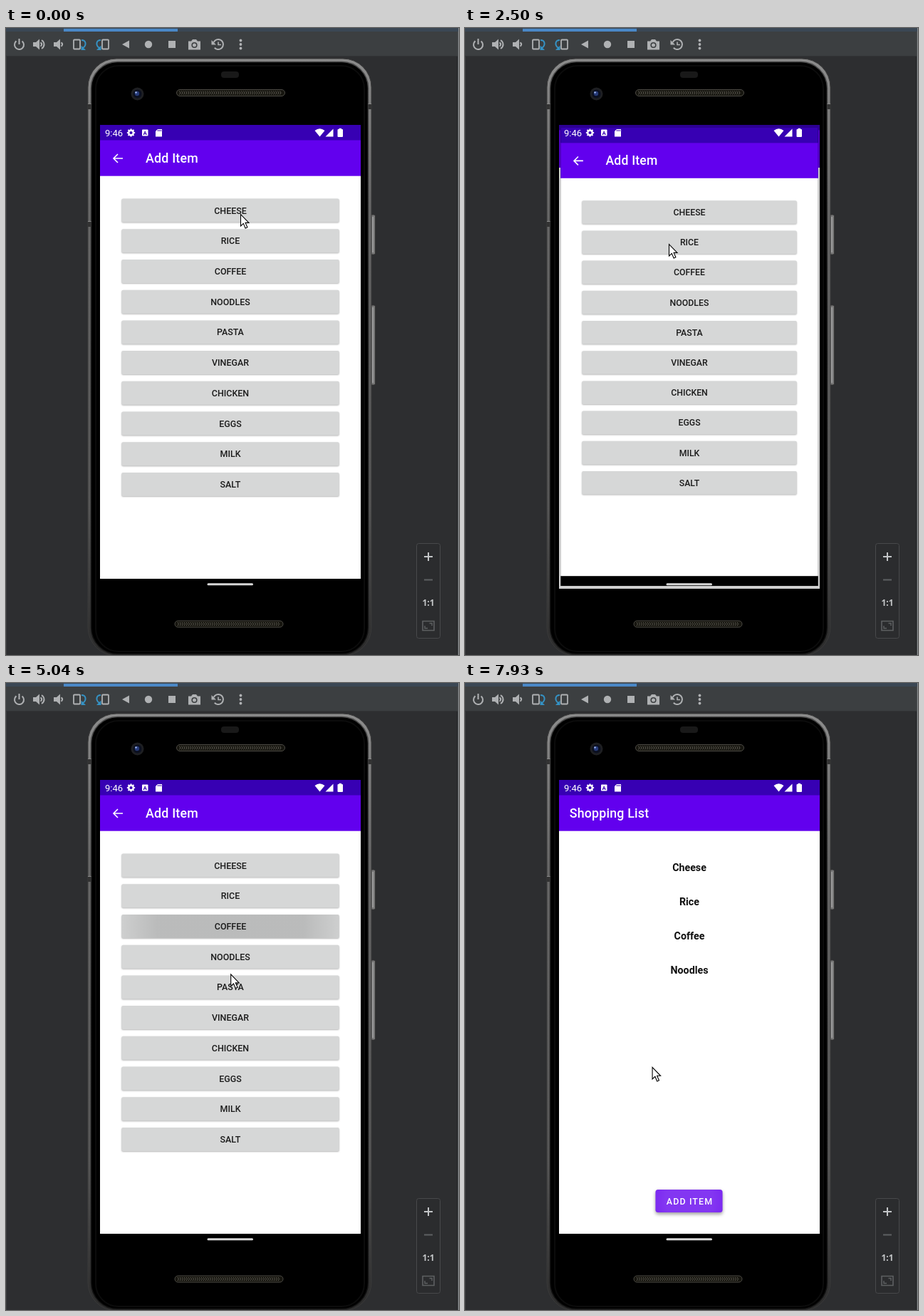
Recreate the animation shown at these times as an HTML page with a canvas. Size 636 by 880 pixels, loop 8000 ms.

```html
<!DOCTYPE html>
<html lang="en">
<head>
<meta charset="utf-8">
<title>Shopping list demo</title>
<style>
html, body { margin: 0; width: 100%; height: 100%; overflow: hidden; background: #2d2e30; }
canvas { display: block; width: 636px; height: 880px; }
</style>
</head>
<body>
<canvas id="stage" width="636" height="880"></canvas>
<script>
const W = 636, H = 880, LOOP = 8000;
const stage = document.getElementById('stage').getContext('2d');
const backdrop = document.createElement('canvas');
backdrop.width = W;
backdrop.height = H;
let c = backdrop.getContext('2d');

const SCREEN = { x: 132, y: 136, w: 366, h: 651, cx: 315, cy: 461.5 };
const GREY = '#afb1b3', BLUE = '#3592c4', DARK = '#3700b3', PURPLE = '#6200ee';
const ITEMS = ['Cheese', 'Rice', 'Coffee', 'Noodles', 'Pasta', 'Vinegar', 'Chicken', 'Eggs', 'Milk', 'Salt'];

// Taps alternate: pick an item, press "Add item", pick the next, and so on.
const TAPS = [354, 2056, 2890, 3885, 4798, 5907, 6860, 7900];
const TAP_DELAY = 280, SWITCH = 400;

const HOME = { x: 329, y: 261 };
const LEGS = [
  { at: 100, dur: 470, x: 315, y: 717 },
  { at: 2030, dur: 320, x: 286, y: 303 },
  { at: 3000, dur: 500, x: 300, y: 722 },
  { at: 3760, dur: 240, x: 270, y: 351 },
  { at: 4200, dur: 420, x: 318, y: 340 },
  { at: 4900, dur: 530, x: 302, y: 732 },
  { at: 5850, dur: 450, x: 311, y: 395 },
  { at: 7100, dur: 470, x: 302, y: 722 },
  { at: 7800, dur: 260, x: 224, y: 360 }
];

const clamp = v => Math.max(0, Math.min(1, v));
const smooth = v => v * v * (3 - 2 * v);
const mix = (a, b, f) => a + (b - a) * f;

function rect(x, y, w, h, color) {
  c.fillStyle = color;
  c.fillRect(x, y, w, h);
}
function round(x, y, w, h, r, fill, line, width = 1) {
  c.beginPath();
  c.roundRect(x, y, w, h, r);
  if (fill) { c.fillStyle = fill; c.fill(); }
  if (line) { c.strokeStyle = line; c.lineWidth = width; c.stroke(); }
}
function disc(x, y, r, color) {
  c.fillStyle = color;
  c.beginPath();
  c.arc(x, y, r, 0, 7);
  c.fill();
}
function arc(x, y, r, from, to, color, width) {
  c.strokeStyle = color;
  c.lineWidth = width;
  c.beginPath();
  c.arc(x, y, r, from, to);
  c.stroke();
}
function shape(d, fill, line, width = 1.5, x = 0, y = 0) {
  const p = new Path2D(d);
  c.save();
  c.translate(x, y);
  if (fill) { c.fillStyle = fill; c.fill(p); }
  if (line) { c.strokeStyle = line; c.lineWidth = width; c.stroke(p); }
  c.restore();
}
function text(s, x, y, font, color, align = 'left', spacing = 0) {
  c.font = font;
  c.fillStyle = color;
  c.textAlign = align;
  c.letterSpacing = spacing + 'px';
  c.fillText(s, x, y);
}
const roboto = (weight, size) => `${weight} ${size}px Roboto, sans-serif`;
const sans = size => `${size}px "Open Sans", sans-serif`;

function fade(y0, y1, ...colors) {
  const g = c.createLinearGradient(0, y0, 0, y1);
  colors.forEach((color, i) => g.addColorStop(i / (colors.length - 1), color));
  return g;
}

function toolbar() {
  rect(0, 0, W, 5, '#3b4754');
  rect(81, 1, 160, 4, '#4a88c7');
  rect(0, 5, W, 35, '#3c3f41');
  rect(0, 39, W, 1, '#323436');
  arc(18.5, 23.5, 6.5, -0.9, 4.05, GREY, 2);
  rect(17.5, 15, 2, 8, GREY);
  for (const [x, loud] of [[46, true], [74, false]]) {
    const left = loud ? x - 8 : x - 7;
    shape('M0-3H4L9-7.5V7.5L4 3H0Z', GREY, null, 1, left, 23);
    arc(left + 9, 23, 3, -1.1, 1.1, GREY, 2);
    if (loud) arc(left + 9, 23, 6.5, -1.1, 1.1, GREY, 2);
  }
  for (const [x, dir] of [[103, 1], [136, -1]]) {
    c.save();
    c.translate(x, 23);
    c.scale(dir, 1);
    round(-8, -6.5, 9, 13, 1, null, GREY, 1.8);
    shape('M3-6C9.5-6 10.500 1 5 5', null, BLUE, 2);
    shape('M2.500 1.500V8H9Z', BLUE);
    c.restore();
  }
  shape('M163 23L173 17.5V28.5Z', GREY);
  disc(200, 23, 5.2, GREY);
  rect(228, 18, 10, 10, GREY);
  shape('M256 18.5H260L262 16H267L269 18.5H273V30.500H256Z', GREY);
  arc(264.5, 24, 3.3, 0, 7, '#3c3f41', 1.6);
  arc(298, 23, 7, -2.7, 2.4, GREY, 2);
  shape('M288.500 17V23.500H295Z', GREY);
  shape('M298 19.500V23.500H302', null, GREY, 1.6);
  for (const y of [17.5, 23, 28.5]) disc(329.5, y, 1.9, GREY);
}

function grille(x, y) {
  round(x, y, 152, 9, 4.5, '#16150f', '#4d4b45');
  for (let i = 0; i < 48; i++) {
    shape('M0 0L1.500 2.500L0 5', null, '#5c5a52', 1, x + 4 + i * 3, y + 2);
  }
}

function phone() {
  for (const [y, h] of [[262, 56], [389, 112]]) {
    round(511, y, 7.5, h, 2, '#777', '#333');
    rect(514, y + 3, 2, h - 6, '#9a9a9a');
  }
  round(115, 43, 398, 838, 40, fade(43, 880, '#8c8c8c', '#686868', '#5e5e5e', '#565656', '#2a2a2a'), '#3a3a3a');
  round(119.5, 47.5, 389, 831, 37, '#000', fade(43, 880, '#4a4a4a', '#1c1c1c', '#141414'), 1.5);
  round(126, 53, 377, 822, 32, null, '#0c0c0c', 2);
  for (const [x, y] of [[115, 106], [115, 271], [508.5, 106]]) {
    rect(x, y, 4.5, 8, '#333');
    rect(x, y, 4.5, 1, '#888');
  }
  round(302, 61, 25, 9, 4, '#191919');
  disc(184.5, 92.5, 9, '#1e1f22');
  disc(184.5, 92.5, 6, '#0b1020');
  disc(184, 92, 3.2, '#263a78');
  disc(182.5, 90.5, 1.3, '#9db4ea');
  grille(239.5, 86.5);
  grille(237, 832);
}

function zoomPanel() {
  round(576.5, 723.5, 33, 133, 3, '#2b2c2e', '#48494b');
  rect(587, 741, 12, 2, '#c3c5c7');
  rect(592, 736, 2, 12, '#c3c5c7');
  rect(587, 773.5, 12, 2, '#5e6062');
  text('1:1', 593, 810.5, 'bold 12px "Open Sans", sans-serif', '#c3c5c7', 'center');
  round(585, 832.5, 16, 13, 0, null, '#5e6062', 1.6);
  shape('M588 839V842.500H592M594.500 835.500H598V839', null, '#5e6062', 1.4);
}

function drawBackdrop() {
  rect(0, 0, W, H, '#2d2e30');
  rect(0, 40, 1, H, '#393b3d');
  rect(633, 40, 1, H, '#232426');
  toolbar();
  rect(634, 5, 1, H, '#4a4d4f');
  rect(635, 0, 1, H, '#8a8d8f');
  phone();
  zoomPanel();
}

function statusIcons() {
  text('9:46', 139, 152, roboto(400, 13), '#fff');
  arc(175.5, 147, 3.3, 0, 7, '#fff', 2.4);
  for (let i = 0; i < 8; i++) {
    const a = i * Math.PI / 4;
    disc(175.5 + 4.7 * Math.cos(a), 147 + 4.7 * Math.sin(a), 1.1, '#fff');
  }
  round(191, 142.5, 8.5, 9, 1, '#fff');
  text('A', 195.2, 150, roboto(700, 8), DARK, 'center');
  shape('M213 142H219V152.500H210V145Z', '#fff');
  for (const x of [213, 215, 217]) rect(x, 143, 1, 2, DARK);
  shape('M433.500 144Q440.500 138.500 447.500 144L440.500 152.500Z', '#fff');
  shape('M459.500 141.500V152.500H448.500Z', '#fff');
  round(465.5, 142, 7.5, 11, 1, '#fff');
  rect(467.5, 140.8, 3.5, 2, '#fff');
}

function shadow(alpha, blur, dy) {
  c.shadowColor = `rgba(0,0,0,${alpha})`;
  c.shadowBlur = blur;
  c.shadowOffsetY = dy;
}

// Soft circular touch feedback inside a button.
function ripple(x, y, w, h, r, rgb, strength, hold, edge) {
  const cx = x + w / 2, cy = y + h / 2;
  const g = c.createRadialGradient(cx, cy, 0, cx, cy, r);
  g.addColorStop(0, `rgba(${rgb},${strength})`);
  g.addColorStop(hold, `rgba(${rgb},${strength})`);
  g.addColorStop(1, `rgba(${rgb},${edge})`);
  round(x, y, w, h, 2.5, g);
}

function chrome(title, x) {
  rect(SCREEN.x, SCREEN.y, SCREEN.w, SCREEN.h, '#000');
  rect(132, 136, 366, 22, DARK);
  rect(132, 157.5, 366, 50.5, PURPLE);
  rect(132, 207.7, 366, 565.3, '#fff');
  text(title, x, 189, roboto(500, 17.8), '#fff', 'left', 0.2);
}

function pickerScreen(t) {
  chrome('Add Item', 196);
  shape('M164 183H151.500M157 177L151 183L157 189', null, '#fff', 1.6);
  ITEMS.forEach((name, i) => {
    const y = 239.5 + i * 42.72;
    c.save();
    shadow(0.28, 2, 1);
    round(162.3, y, 305.4, 33, 2, '#d6d7d7');
    c.restore();
    const dt = t - TAPS[2 * i];
    if (dt >= 0 && dt < 700) ripple(162.3, y, 305.4, 33, 84 + 0.3 * dt, '0,0,0', 0.13, 0.66, 0.03);
    text(name.toUpperCase(), 315, y + 21, roboto(500, 12.46), '#1c1c1c', 'center');
  });
}

function listScreen(t, count) {
  chrome('Shopping List', 146.7);
  ITEMS.slice(0, count).forEach((name, i) => {
    text(name, 315, 264 + i * 47.85, roboto(700, 14.24), '#101010', 'center');
  });
  const press = TAPS.findLast((tap, i) => i % 2 && tap <= t) ?? -LOOP;
  const dt = t - press, raised = dt < 200;
  c.save();
  shadow(0.4, raised ? 5 : 3, raised ? 2.5 : 1.5);
  round(267.5, 711, 94, 32, 3.5, PURPLE);
  c.restore();
  if (dt < 700) {
    const spread = clamp(dt / TAP_DELAY);
    ripple(267.5, 711, 94, 32, 60 + dt, '255,255,255', 0.21, mix(0.3, 0.9, spread), 0.2 * spread);
  }
  text('ADD ITEM', 315.5, 731.6, roboto(500, 12.46), '#fff', 'center', 1.11);
}

// Draws a window scaled about the middle of the display.
function pane(scale, alpha, draw) {
  if (alpha <= 0) return;
  c.save();
  c.globalAlpha = alpha;
  c.translate(SCREEN.cx, SCREEN.cy);
  c.scale(scale, scale);
  c.translate(-SCREEN.cx, -SCREEN.cy);
  draw();
  c.restore();
}

const bezier = (u, a, b, d, e) => {
  const v = 1 - u;
  return v * v * v * a + 3 * v * v * u * b + 3 * v * u * u * d + u * u * u * e;
};
// Fast out, extra slow in: two joined cubic curves.
function ease(x) {
  if (x <= 0) return 0;
  if (x >= 1) return 1;
  const first = x < 1 / 6;
  const xs = first ? [0, 0.05, 0.1333, 1 / 6] : [1 / 6, 0.2083, 0.25, 1];
  const ys = first ? [0, 0, 0.06, 0.4] : [0.4, 0.82, 1, 1];
  let lo = 0, hi = 1;
  for (let i = 0; i < 24; i++) {
    const mid = (lo + hi) / 2;
    if (bezier(mid, ...xs) < x) lo = mid; else hi = mid;
  }
  return bezier(lo, ...ys);
}

function display(t) {
  const done = TAPS.filter(tap => tap + TAP_DELAY <= t).length;
  const opening = done % 2 === 0;
  const count = Math.ceil(done / 2);
  const age = done ? t - TAPS[done - 1] - TAP_DELAY : LOOP;
  const p = ease(age / SWITCH), moving = age < SWITCH;
  const shown = clamp((age - 35) / 50);
  const list = (scale, alpha) => pane(scale, alpha, () => listScreen(t, count));
  const picker = (scale, alpha) => pane(scale, alpha, () => pickerScreen(t));
  c.save();
  c.beginPath();
  c.rect(SCREEN.x, SCREEN.y, SCREEN.w, SCREEN.h);
  c.clip();
  if (opening) {
    if (moving) list(mix(1, 1.05, p), mix(1, 0.8, p));
    picker(mix(0.85, 1, p), shown);
  } else {
    list(mix(1.05, 1, p), 1);
    if (moving) picker(mix(1, 0.9, p), 1 - shown);
  }
  c.restore();
  statusIcons();
  round(282.5, 779.3, 64.5, 3, 1.5, '#d8d8d8');
}

function notice(t) {
  const alpha = Math.min(clamp((t - 60) / 210), clamp((1860 - t) / 300));
  if (!alpha) return;
  c.save();
  c.globalAlpha = alpha;
  round(204, 796.5, 420, 77.5, 1, '#4d5052', '#5b5e60');
  disc(226, 820.5, 8.7, BLUE);
  rect(225, 819, 2.2, 6.5, '#4d5052');
  rect(225, 815.3, 2.2, 2.3, '#4d5052');
  text('Externally added files can be added to Git', 244, 826, sans(14), '#bbbdbf');
  text('View Files', 244, 853, sans(14), '#589df6');
  text('Always Add', 328.5, 853, sans(14), '#589df6');
  text("Don't Ask Again", 425, 853, sans(14), '#589df6');
  c.restore();
}

function pointer(t) {
  let { x, y } = HOME;
  for (const leg of LEGS) {
    const f = smooth(clamp((t - leg.at) / leg.dur));
    x = mix(x, leg.x, f);
    y = mix(y, leg.y, f);
  }
  shape('M.5.500V17L4.300 13.400L7.100 20L9.900 18.800L7.100 12.400H12Z', '#fff', '#000', 1.1, x, y);
}

drawBackdrop();
c = stage;
const start = performance.now();
function frame() {
  const t = (performance.now() - start) % LOOP;
  c.drawImage(backdrop, 0, 0);
  display(t);
  notice(t);
  pointer(t);
  requestAnimationFrame(frame);
}
frame();
</script>
</body>
</html>
```
